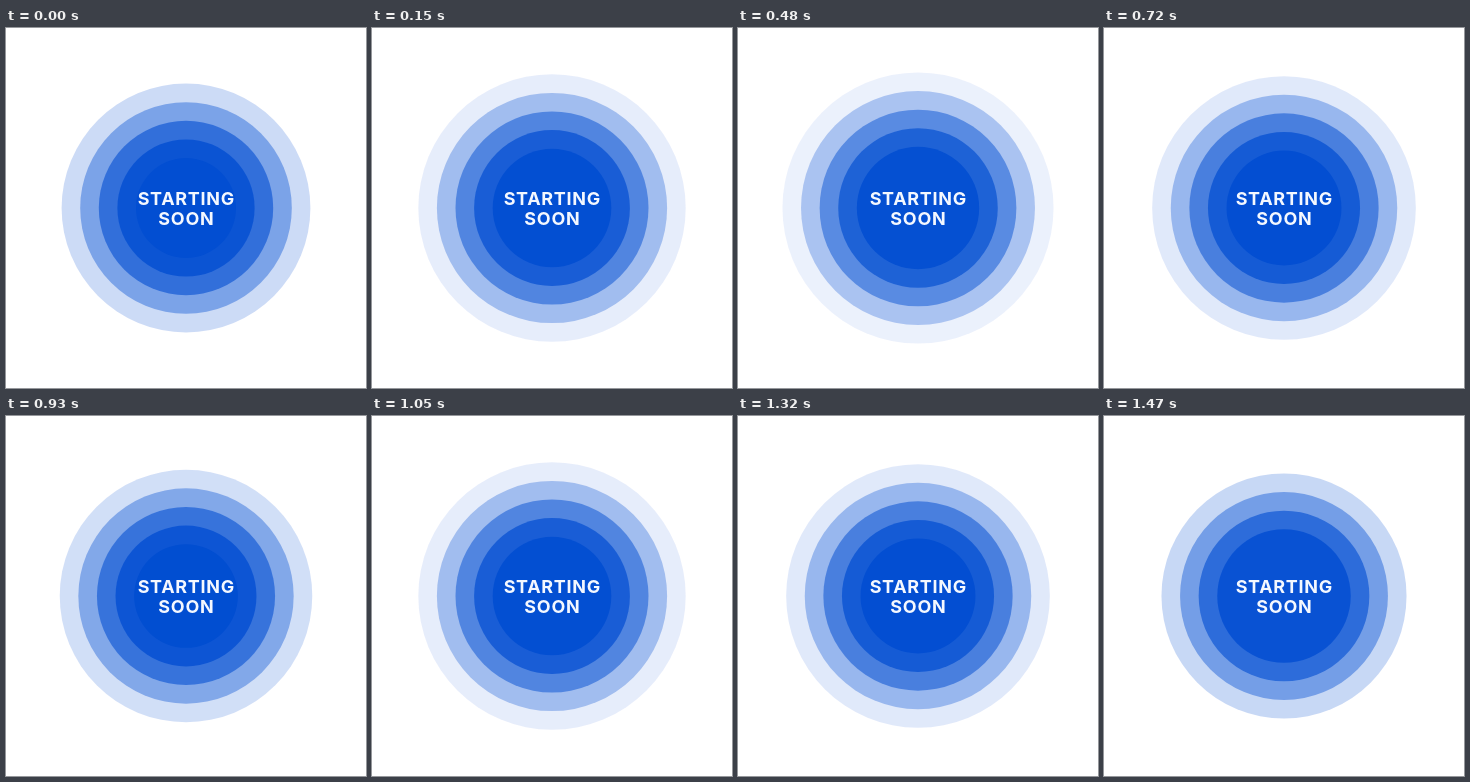
These frames come from a looping animation (360x360 px, 1.5 s). An HTML page with a canvas:

```html
<!DOCTYPE html>
<html lang="en">
<head>
<meta charset="utf-8">
<title>Starting soon</title>
<style>
  html, body { margin: 0; width: 100%; height: 100%; overflow: hidden; background: #fff; }
  canvas { display: block; width: 360px; height: 360px; }
</style>
</head>
<body>
<canvas id="stage" width="360" height="360"></canvas>
<script>
const ctx = document.getElementById('stage').getContext('2d');
const CENTER = 180;
const LIFE = 1500;
const STEP = 30;
const RIPPLES = 5;
const START_RADIUS = 50;
const GROWTH = 93;
const MIN_ALPHA = 0.05;

function drawRipple(age) {
  const alpha = 1 - age;
  if (alpha < MIN_ALPHA) return;
  ctx.fillStyle = `rgba(2, 78, 210, ${alpha})`;
  ctx.beginPath();
  ctx.arc(CENTER, CENTER, START_RADIUS + GROWTH * age, 0, Math.PI * 2);
  ctx.fill();
}

function drawLabel() {
  ctx.fillStyle = '#f4f8ff';
  ctx.font = '700 18px Inter, sans-serif';
  ctx.letterSpacing = '0.7px';
  ctx.textAlign = 'center';
  ctx.textBaseline = 'alphabetic';
  ctx.fillText('STARTING', CENTER + 0.35, 177);
  ctx.fillText('SOON', CENTER + 0.35, 196.5);
}

function draw(time) {
  const t = Math.floor((time % LIFE) / STEP) * STEP;
  const interval = LIFE / RIPPLES;
  ctx.fillStyle = '#fff';
  ctx.fillRect(0, 0, 360, 360);
  for (let i = RIPPLES - 1; i >= 0; i--) {
    drawRipple((t % interval + i * interval) / LIFE);
  }
  drawLabel();
}

let start = null;
function tick(now) {
  if (start === null) start = now;
  draw(Math.max(0, now - start));
  requestAnimationFrame(tick);
}
draw(0);
requestAnimationFrame(tick);
</script>
</body>
</html>
```
